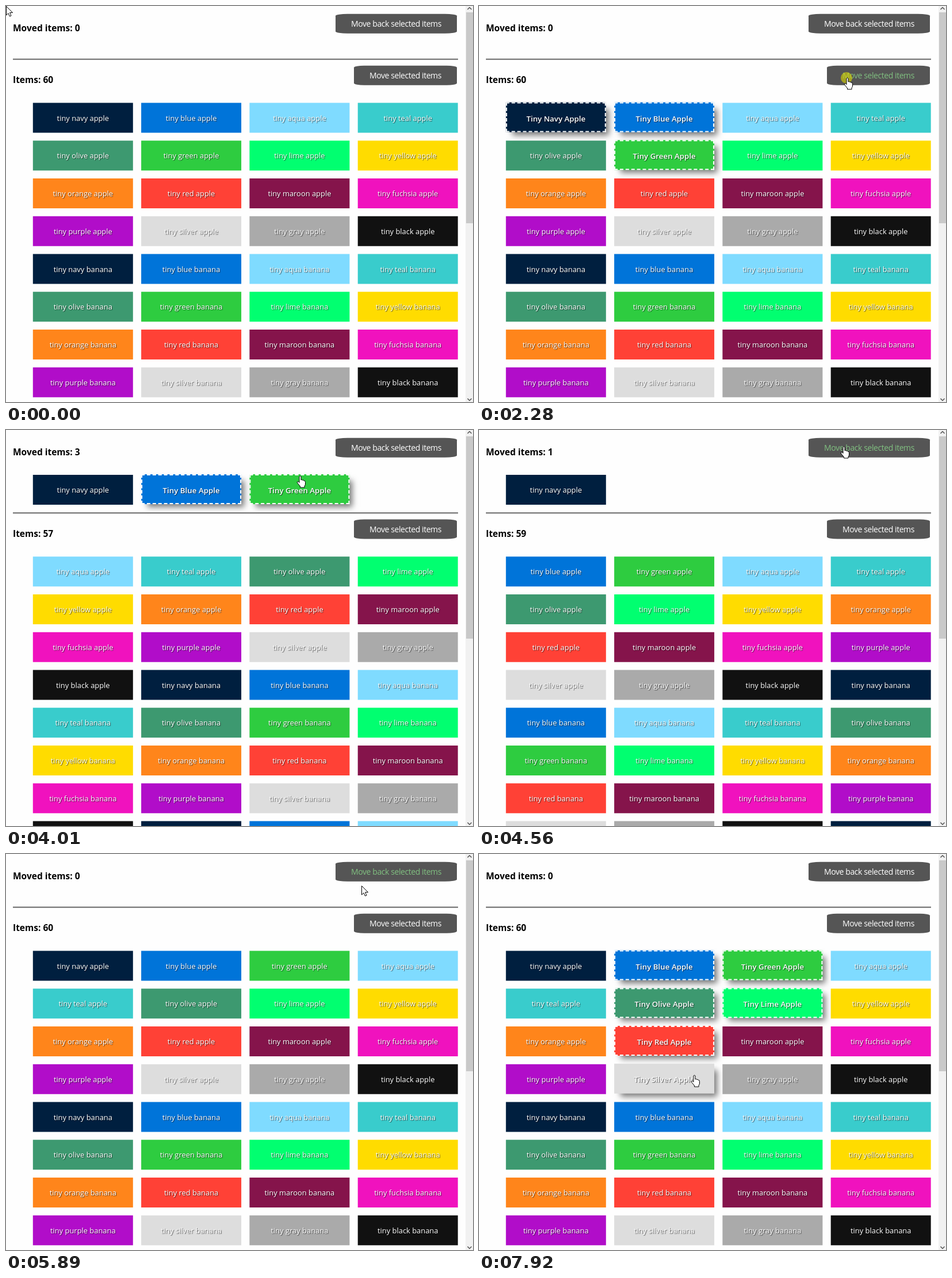
These frames come from a looping animation (812 px wide and 689 px high, 7990 ms). An HTML page:

```html
<!DOCTYPE html>
<html lang="en">
<head>
<meta charset="utf-8">
<title>Moving items</title>
<style>
html, body { margin: 0; width: 100%; height: 100%; overflow: hidden; background: #fefefe; }
body { position: relative; font-family: "Open Sans", "Noto Sans", sans-serif; }
body > * { position: absolute; left: 0; top: 0; box-sizing: border-box; white-space: pre; }
h2 { left: 12px; margin: 0; font-size: 15.5px; line-height: 24px; color: #000; }
.button {
  height: 34px; line-height: 34px; border-radius: 10%; text-align: center;
  background: #555; color: #fff; font-size: 14px; letter-spacing: -.42px;
}
.button.over { color: #80c080; }
#line { left: 12px; width: 774px; height: 2px; background: #666; }
.tile {
  width: 174px; height: 52px; line-height: 52px; text-align: center;
  font-size: 12.9px; font-weight: 500; color: #fff; text-shadow: 1px 1px 1px #0009;
}
.tile.over, .tile.picked {
  z-index: 1; top: -1.5px; line-height: 54px; font-size: 13.3px; font-weight: 600;
  text-transform: capitalize; box-shadow: 8px 8px 10px -3px #0008;
}
.tile.picked { border: 2px dashed #fff; line-height: 52px; }
#bar { left: 799px; width: 13px; height: 689px; background: #f1f1f1; z-index: 2; }
#thumb { left: 800px; top: 11px; width: 12px; background: #c9c9c9; z-index: 3; }
#spot { width: 20px; height: 20px; border-radius: 50%; background: rgba(220, 215, 0, .6); z-index: 4; }
#cursor { width: 812px; height: 689px; z-index: 5; }
#cursor path { fill: #fff; stroke: #000; stroke-linejoin: round; }
#cursor .chevron { fill: none; stroke: #555; stroke-width: 1.5; }
</style>
</head>
<body>
<h2 id="movedTitle" style="top:26px"></h2>
<h2 id="itemsTitle"></h2>
<div class="button" id="back" style="width:211px">Move back selected items</div>
<div class="button" id="out" style="width:179px">Move selected items</div>
<div id="line"></div>
<div id="bar"></div>
<div id="thumb"></div>
<div id="spot"></div>
<svg id="cursor" viewBox="0 0 812 689">
  <path class="chevron" d="M802.5 6L806 2.5L809.5 6M802.5 683L806 686.5L809.5 683"/>
  <path id="arrow" d="M.5 .5V16L4 12.7L6.4 18L9 17L6.6 11.6H11.5Z"/>
  <path id="hand" d="M-1 2Q.5 -.5 2 2V8Q4 6.5 5 8.5Q7 7.5 7.5 9.5Q9.5 9 9.5 11.5V15Q9.5 17 8 18.5V21H.5V19L-4 13.5Q-5.5 11.5-4 10.7Q-2.5 10.2-1 12.5Z"/>
</svg>
<script>
const LOOP = 7990, STEP = 70, REST = 210, PRESS = 130;
const $ = id => document.getElementById(id);

const colors = {
  navy: '#001f3f', blue: '#0074d9', aqua: '#7fdbff', teal: '#39cccc',
  olive: '#3d9970', green: '#2ecc40', lime: '#01ff70', yellow: '#ffdc00',
  orange: '#ff851b', red: '#ff4136', maroon: '#85144b', fuchsia: '#f012be',
  purple: '#b10dc9', silver: '#ddd', gray: '#aaa', black: '#111'
};

// The cursor leaves each stop at its time; a named stop is clicked just before
const stops = [
  [260, 268, 108], [680, 200, 190, 'navy'], [1100, 350, 190, 'blue'], [1450, 385, 255, 'green'],
  [1860, 575, 150], [2410, 640, 124, 'out'],
  [2690, 395, 240], [3040, 379, 200], [3390, 372, 100, 'blue'], [3870, 460, 100, 'green'],
  [4560, 634, 28, 'back'], [5190, 150, 105, 'navy'], [5750, 625, 30, 'back'],
  [5890, 618, 55], [6380, 370, 190, 'blue'], [6720, 470, 190, 'green'], [7190, 477, 261, 'lime'],
  [7490, 375, 265, 'olive'], [7710, 370, 325, 'red'], [7870, 374, 384]
].map(([time, x, y, target]) => ({ time, x, y, target }));

const tiles = ['apple', 'banana', 'cherry', 'grape'].flatMap(fruit =>
  Object.keys(colors).map(color => ({ color, fruit, w: 174, h: 52 }))).slice(0, 60);
for (const tile of tiles) {
  tile.el = document.createElement('div');
  tile.el.className = 'tile';
  tile.el.textContent = `tiny ${tile.color} ${tile.fruit}`;
  tile.el.style.background = colors[tile.color];
  document.body.insertBefore(tile.el, $('bar'));
}
const back = { el: $('back'), w: 211, h: 34 };
const out = { el: $('out'), w: 179, h: 34 };
const boxes = [back, out, ...tiles];

function cursorAt(t) {
  const next = stops.find(s => s.time > t) || stops[stops.length - 1];
  const last = stops[stops.indexOf(next) - 1] || next;
  const travel = next.time - last.time - (next.target ? REST : 0);
  const held = Math.floor((t - last.time) / STEP) * STEP;
  const k = t - last.time >= travel ? 1 : held / travel;
  return [last.x + (next.x - last.x) * k, last.y + (next.y - last.y) * k];
}

function stateAt(t) {
  let items = tiles, moved = [], picked = new Set();
  const isPicked = tile => picked.has(tile), isLeft = tile => !picked.has(tile);
  for (const { target } of stops.filter(s => s.target && s.time <= t)) {
    if (target === 'out') {
      moved = [...moved, ...items.filter(isPicked)];
      items = items.filter(isLeft);
      picked.clear();
    } else if (target === 'back') {
      items = [...moved.filter(isPicked), ...items];
      moved = moved.filter(isLeft);
      picked.clear();
    } else {
      picked.add(tiles.find(tile => tile.color === target));
    }
  }
  return { items, moved, picked };
}

function put(box, x, y) {
  Object.assign(box, { x, y });
  box.el.style.transform = `translate(${x}px, ${y}px)`;
}

function layGrid(list, top) {
  list.forEach((tile, i) => put(tile, 46.8 + i % 4 * 188.3, top + Math.floor(i / 4) * 65.75));
}

const hit = ([x, y]) => boxes.find(b => x >= b.x && x < b.x + b.w && y >= b.y && y < b.y + b.h);

function draw(t) {
  const { items, moved, picked } = stateAt(t);
  const shift = moved.length ? 51.75 : 0;
  layGrid(moved, 78);
  layGrid(items, 168.5 + shift);
  put(back, 573, 13.75);
  put(out, 605, 103.75 + shift);
  $('line').style.transform = `translateY(${91.6 + shift}px)`;
  $('itemsTitle').style.top = 116 + shift + 'px';
  $('movedTitle').textContent = 'Moved items: ' + moved.length;
  $('itemsTitle').textContent = 'Items: ' + items.length;
  $('thumb').style.height = (shift ? 352 : 367) + 'px';

  // Hover styling trails the cursor by one step
  const [x, y] = cursorAt(t);
  const hovered = hit(cursorAt(Math.max(0, t - STEP)));
  for (const box of boxes) {
    box.el.classList.toggle('over', box === hovered);
    box.el.classList.toggle('picked', picked.has(box));
  }

  const onTarget = !!hit([x, y]);
  $('arrow').style.display = onTarget ? 'none' : '';
  $('hand').style.display = onTarget ? '' : 'none';
  for (const id of ['arrow', 'hand']) {
    $(id).setAttribute('transform', `translate(${Math.round(x)} ${Math.round(y)})`);
  }

  const pressed = stops.some(s => s.target && t >= s.time - PRESS && t < s.time);
  $('spot').style.display = pressed ? '' : 'none';
  $('spot').style.transform = `translate(${x - 11}px, ${y - 9}px)`;
}

const start = performance.now();
function tick() {
  draw((performance.now() - start) % LOOP);
  requestAnimationFrame(tick);
}
tick();
</script>
</body>
</html>
```
